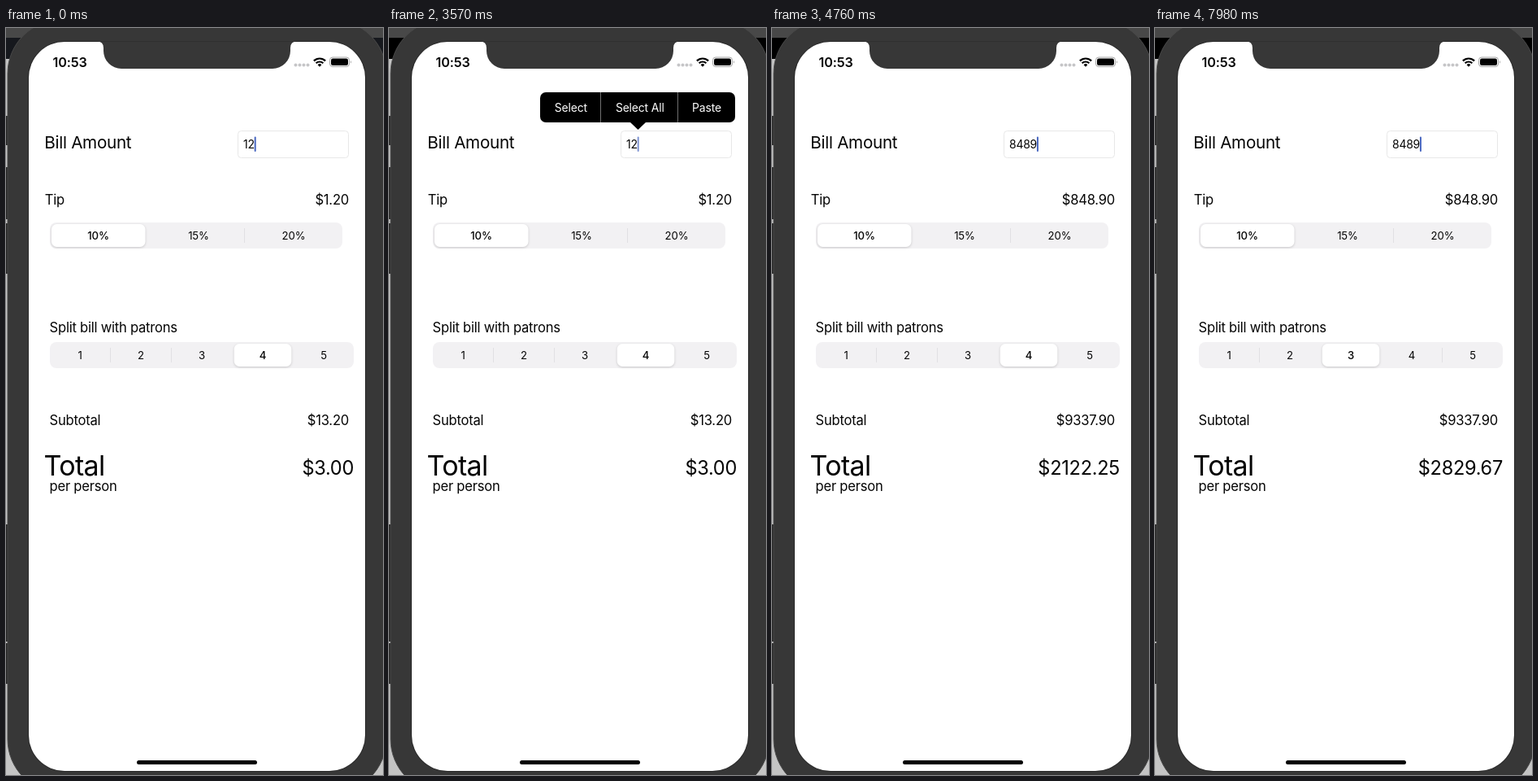
These frames come from a looping animation (464x918 px, 8000 ms). An HTML page:

```html
<!DOCTYPE html>
<html lang="en">
<head>
<meta charset="utf-8">
<title>Tip calculator</title>
<style>
  html, body { margin: 0; width: 100%; height: 100%; overflow: hidden; background: #c4c4c4; }
  svg { display: block; width: 464px; height: 918px; }
  text { font: 16.6px Inter, Roboto, sans-serif; letter-spacing: -.015em; fill: #050505; white-space: pre; }
  .title { font-size: 20.7px; }
  .total { font-size: 34px; letter-spacing: -.02em; }
  .sum { font-size: 23.6px; letter-spacing: -.013em; }
  .field { font-size: 14px; letter-spacing: -.02em; }
  .clock { font-size: 16.2px; font-weight: 600; letter-spacing: -.01em; }
  .segment { font-size: 13.2px; letter-spacing: -.01em; text-anchor: middle; }
  .selected { font-weight: 550; }
  .right { text-anchor: end; }
  .track { fill: #f2f1f3; }
  .divider { fill: #e1e0e3; }
  .pill { fill: #fff; filter: drop-shadow(0 1px 1.5px rgba(0, 0, 0, .17)); }
  #menu text { font-size: 13.9px; letter-spacing: -.01em; fill: #fff; text-anchor: middle; }
</style>
</head>
<body>
<svg viewBox="0 0 464 918">
  <!-- desktop behind the device -->
  <rect width="464" height="918" fill="#c4c4c4"/>
  <rect width="464" height="12" fill="#484848"/>
  <rect id="backdrop" y="12" width="464" height="26"/>
  <g fill="#292929">
    <rect y="108" width="5" height="36"/>
    <rect y="171" width="5" height="64"/>
    <rect y="240" width="5" height="62"/>
    <rect y="610" width="5" height="144"/>
    <rect y="756" width="5" height="50"/>
  </g>

  <!-- device -->
  <rect x="2" y="-10" width="466" height="950" rx="66" fill="#373737" stroke="#484848"/>
  <rect x="27" y="16" width="416" height="898" rx="45" fill="#2a2a2a"/>
  <rect x="28" y="17" width="414" height="896" rx="44" fill="#fff"/>
  <path fill="#373737" d="M112 16.5 q8 0 8 8 v3.5 a22 22 0 0 0 22 22 h186 a22 22 0 0 0 22 -22 v-3.5 q0 -8 8 -8 z"/>
  <rect x="161" y="900" width="148" height="5" rx="2.5"/>

  <!-- status bar -->
  <text class="clock" x="57.5" y="47.5">10:53</text>
  <g fill="#c6c6c8">
    <circle cx="356.5" cy="45.5" r="2"/><circle cx="361.5" cy="45.5" r="2"/>
    <circle cx="366.5" cy="45.5" r="2"/><circle cx="371.5" cy="45.5" r="2"/>
  </g>
  <g fill="none" stroke="#000" stroke-width="2.2">
    <path d="M378.9 40.4 a10.2 10.2 0 0 1 14.2 0"/>
    <path d="M381.6 43.3 a6.3 6.3 0 0 1 8.8 0"/>
  </g>
  <path d="M386 47.8 l-2.4 -2.6 a3.5 3.5 0 0 1 4.8 0 z"/>
  <rect x="398.5" y="36" width="24" height="11.5" rx="3.5" fill="none" stroke="#a5a5a5"/>
  <rect x="400" y="37.5" width="21" height="8.5" rx="2.2"/>
  <path d="M424 40 q2 1.8 0 3.6 z" fill="#a5a5a5"/>

  <!-- form -->
  <text class="title" x="47.3" y="147.5">Bill Amount</text>
  <rect x="285.5" y="126.5" width="136" height="33" rx="4" fill="#fff" stroke="#e8e8e8"/>
  <text class="field" id="bill" x="292" y="148"></text>
  <rect id="caret" y="133.5" width="2" height="18.5" rx="1" fill="#4866c0"/>

  <text x="47.8" y="216.5">Tip</text>
  <text class="right" id="tip" x="422" y="216.5"></text>
  <rect class="track" x="54" y="239" width="360" height="32" rx="8"/>
  <rect class="divider" x="293" y="246" width="1" height="18"/>
  <rect class="pill" x="56" y="241" width="115.5" height="28" rx="6.5"/>
  <text class="segment selected" x="113.5" y="259.5">10%</text>
  <text class="segment" x="237" y="259.5">15%</text>
  <text class="segment" x="354" y="259.5">20%</text>

  <text x="53.6" y="373.5">Split bill with patrons</text>
  <rect class="track" x="54" y="386" width="374" height="32" rx="8"/>
  <g id="dividers"></g>
  <rect class="pill" id="pill" y="388" width="70.5" height="28" rx="6.5"/>
  <g id="patrons"></g>

  <text x="53.6" y="487.5">Subtotal</text>
  <text class="right" id="subtotal" x="422" y="487.5"></text>
  <text class="total" x="46.6" y="549.5">Total</text>
  <text class="right sum" id="total" x="428" y="549"></text>
  <text x="53.6" y="568.5">per person</text>

  <g id="menu">
    <rect x="186" y="79" width="240" height="37" rx="7"/>
    <path d="M296.5 115.5 h20 l-10 9.5 z"/>
    <path d="M260.5 79 v37 M355.5 79 v37" stroke="#707070"/>
    <text x="223.8" y="102.5">Select</text>
    <text x="308.8" y="102.5">Select All</text>
    <text x="391" y="102.5">Paste</text>
  </g>
</svg>
<script>
const LOOP = 8000, STEP = 70;
const $ = id => document.getElementById(id);

const typed = [[0, '12'], [3640, '1'], [3780, ''], [4060, '8'], [4200, '84'], [4620, '848'], [4760, '8489']];
const splits = [[0, 4], [6230, 1], [6650, 2], [7020, 3]];
// Fades as [start, end, opacity reached]
const caretFades = [
  [0, 280, 0], [420, 700, 1], [980, 1330, 0], [1400, 1540, 1], [2030, 2240, 0], [2450, 2590, 1],
  [3080, 3290, 0], [3500, 3600, 1], [5180, 5460, 0], [5600, 5880, 1],
  [6230, 6510, 0], [6650, 6930, 1], [7280, 7560, 0], [7700, 7980, 1]
];
const menuFades = [[1750, 1960, 1], [3570, 3850, 0]];

const clamp = x => Math.max(0, Math.min(1, x));
const latest = (events, t) => events.filter(([at]) => at <= t).pop()[1];
const money = x => '$' + x.toFixed(2);
const center = n => 16 + 75 * n;

function fade(list, initial, t) {
  return list.reduce((v, [from, to, goal]) => v + (goal - v) * clamp((t - from) / (to - from)), initial);
}

// Critically damped approach, t in ms
function spring(t) {
  const x = 0.016 * Math.max(0, t);
  return 1 - (1 + x) * Math.exp(-x);
}

function add(parent, tag, attributes, content = '') {
  const node = document.createElementNS('http://www.w3.org/2000/svg', tag);
  for (const name in attributes) node.setAttribute(name, attributes[name]);
  node.textContent = content;
  return $(parent).appendChild(node);
}

const labels = [1, 2, 3, 4, 5].map(n => add('patrons', 'text', { class: 'segment', x: center(n), y: 406.5 }, n));
const dividers = [1, 2, 3, 4].map(n =>
  add('dividers', 'rect', { class: 'divider', x: center(n) + 37, y: 393, width: 1, height: 18 }));

function draw(t) {
  const text = latest(typed, t), amount = Number(text), people = latest(splits, t);
  $('bill').textContent = text;
  $('tip').textContent = money(amount * 0.1);
  $('subtotal').textContent = money(amount * 1.1);
  $('total').textContent = money(amount / people);

  $('caret').setAttribute('x', 292 + (text ? $('bill').getComputedTextLength() : 0));
  $('caret').setAttribute('opacity', fade(caretFades, 1, t));
  $('menu').setAttribute('opacity', fade(menuFades, 0, t));
  $('backdrop').setAttribute('fill', t < 1470 ? '#16181d' : '#000');

  let x = center(splits[0][1]);
  for (let i = 1; i < splits.length; i++) {
    x += (center(splits[i][1]) - center(splits[i - 1][1])) * spring(t - splits[i][0]);
  }
  $('pill').setAttribute('x', x - 35.2);
  labels.forEach((label, i) =>
    label.classList.toggle('selected', people === i + 1 && Math.abs(x - center(i + 1)) < 6));
  dividers.forEach((divider, i) =>
    divider.setAttribute('opacity', clamp((Math.abs(x - center(i + 1) - 37.5) - 40) / 20)));
}

const start = performance.now();
function tick() {
  const t = Math.max(0, performance.now() - start) % LOOP;
  draw(Math.floor(t / STEP) * STEP);
  requestAnimationFrame(tick);
}
tick();
</script>
</body>
</html>
```
